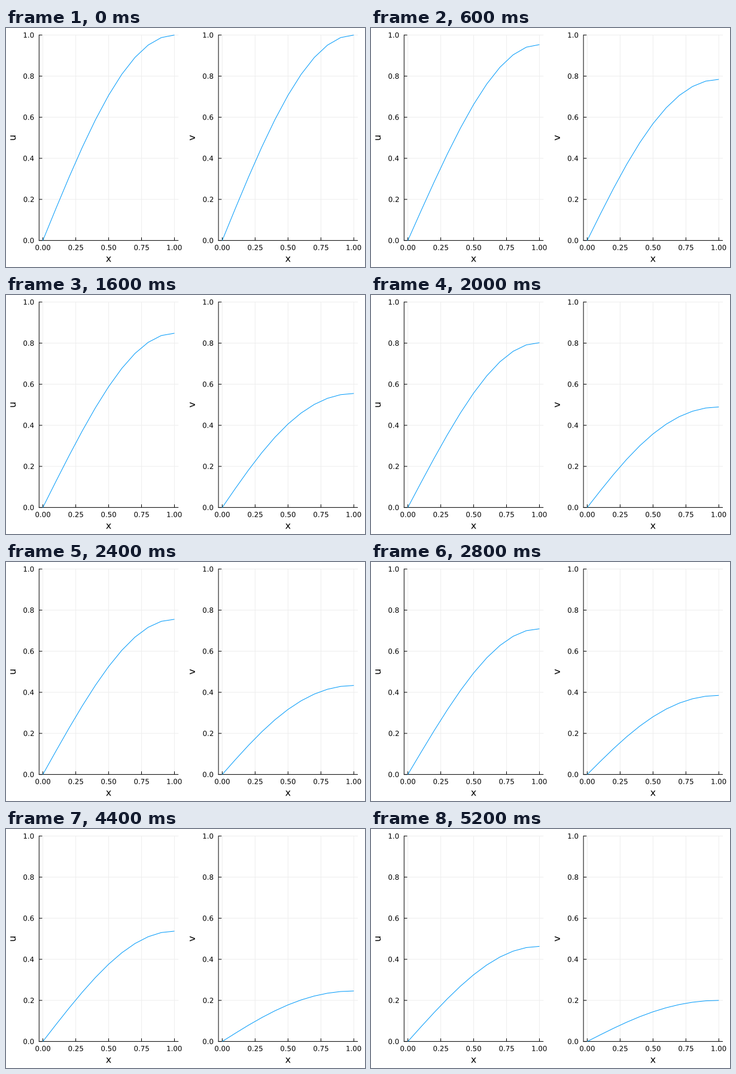
Write a matplotlib script that moves like this. It is 600x400 px and loops after 5300 ms.

```python
import math

import matplotlib.pyplot as plt
import numpy as np
from matplotlib.animation import FuncAnimation
from matplotlib.patches import PathPatch
from matplotlib.textpath import TextPath
from matplotlib.transforms import Affine2D

FRAMES, INTERVAL = 53, 100
W, H, DPI = 600, 400, 100
PT = 72 / DPI
PANEL = 299.8
LEFT, RIGHT = 55.3, 288.2
X0, X1 = 61.6, 281.5
TOP, BASE = 11.8, 355.6
TICK = 5.2

plt.rcParams["font.family"] = "DejaVu Sans"
fig = plt.figure(figsize=(W / DPI, H / DPI), dpi=DPI, facecolor="white")
ax = fig.add_axes([0, 0, 1, 1])
ax.set(xlim=(0, W), ylim=(H, 0))
ax.axis("off")


def to_x(x):
    return X0 + x * (X1 - X0)


def to_y(y):
    return BASE - y * (BASE - TOP)


def rule(xs, ys, color, z):
    ax.plot(xs, ys, color=color, lw=PT, zorder=z, snap=False,
            solid_capstyle="butt")


def label(x, y, text, size, align=0.5, turn=0):
    """Unhinted outline text; align is the share of its width left of x."""
    path = TextPath((0, 0), text, size=size)
    box = path.get_extents()
    place = (Affine2D().translate(-box.x0 - align * box.width, 0)
             .scale(1, -1).rotate_deg(-turn).translate(x, y))
    ax.add_patch(PathPatch(place.transform_path(path), fc="black", lw=0,
                           zorder=2, snap=False))


def panel(dx, name):
    left, right = LEFT + dx, RIGHT + dx
    for t in np.linspace(0, 1, 5):
        x = to_x(t) + dx
        rule([x, x], [TOP, BASE], "#eeeeee", 1)
        rule([x, x], [BASE, BASE - TICK], "black", 2)
        label(x, 371.6, f"{t:.2f}", 11.8)
    for t in np.linspace(0, 1, 6):
        y = to_y(t)
        rule([left, right], [y, y], "#eeeeee", 1)
        rule([left, left + TICK], [y, y], "black", 2)
        label(46.4 + dx, y + 4.3, f"{t:.1f}", 11.8, align=1)
    rule([left, left], [TOP - 0.5, BASE + 0.5], "black", 2)
    rule([left - 0.5, right], [BASE, BASE], "black", 2)
    label(171.5 + dx, 391.3, "x", 16)
    label(16 + dx, (TOP + BASE) / 2, name, 16, turn=90)
    line, = ax.plot([], [], color="#009AFA", lw=PT, zorder=3,
                    solid_joinstyle="miter", solid_capstyle="butt")
    return line


def decay(values):
    """Smooth logarithmic decay of the right end value."""
    weights = [20, 3, 5, 5, 5, 5, 5, 5]
    fit = np.polyfit(KEYS, np.log(values), 5, w=weights)
    return np.exp(np.polyval(fit, np.arange(FRAMES)))


KEYS = [0, 6, 12, 20, 28, 36, 44, 52]
u_end = decay([1, 0.953, 0.893, 0.802, 0.709, 0.620, 0.537, 0.463])
v_end = decay([1, 0.787, 0.632, 0.490, 0.385, 0.306, 0.246, 0.200])

x = np.linspace(0, 1, 11)
mode1 = np.sin(math.pi * x / 2)
mode3 = np.sin(3 * math.pi * x / 2)
u_line = panel(0, "u")
v_line = panel(PANEL, "v")


def profile(end, b):
    return (end + b) * mode1 + b * mode3


def draw(i):
    # The u*v reaction feeds the third mode with opposite signs.
    u, v = u_end[i], v_end[i]
    feed = u * v * (1 - math.exp(-0.15 * i))
    u_line.set_data(to_x(x), to_y(profile(u, -0.019 * feed)))
    v_line.set_data(to_x(x) + PANEL, to_y(profile(v, 0.023 * feed)))
    return u_line, v_line


anim = FuncAnimation(fig, draw, frames=FRAMES, interval=INTERVAL,
                     repeat=True, repeat_delay=0)
plt.show()
```
